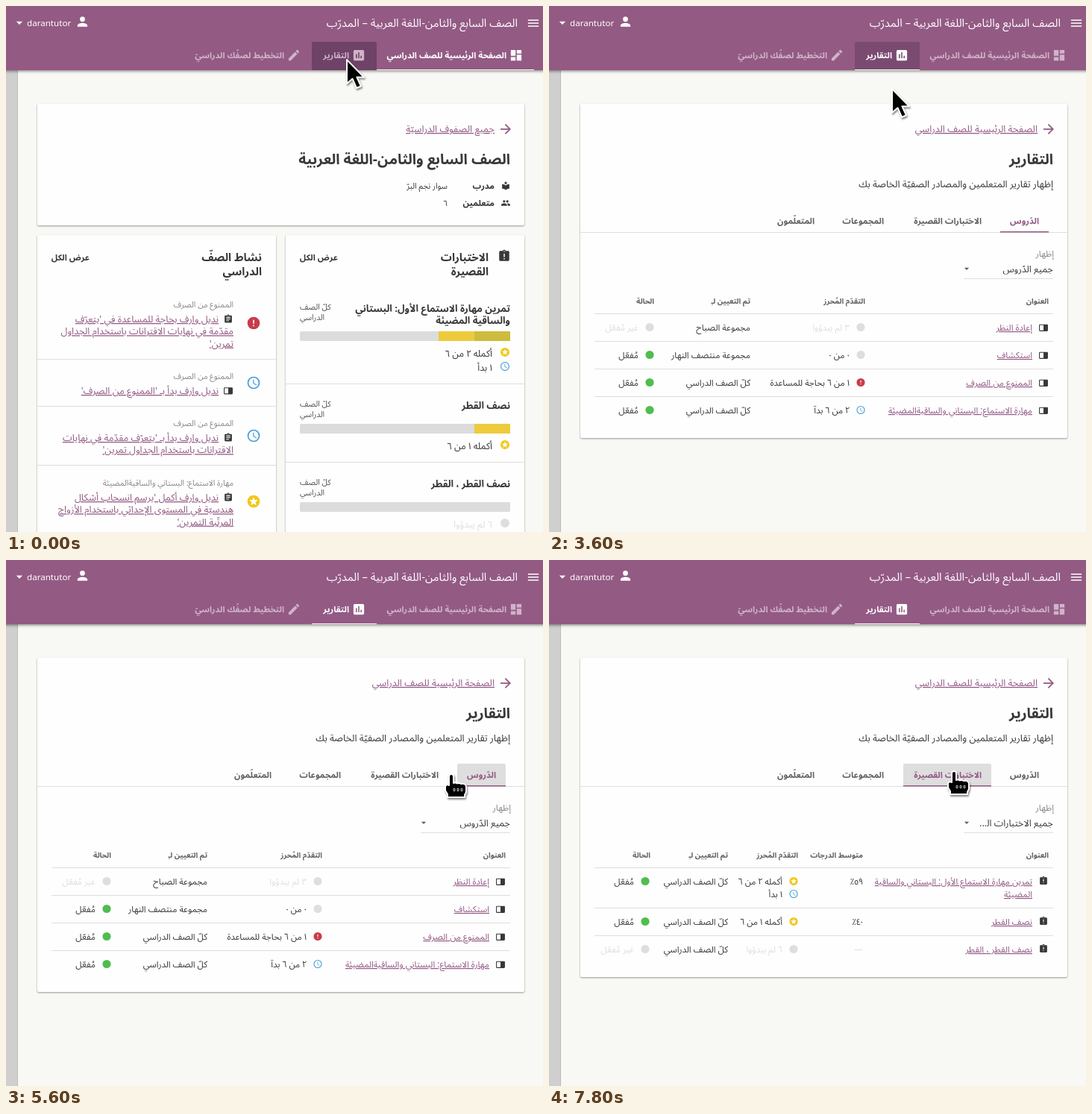
Animation, 720 px wide and 705 px high, one loop 8 s. Source, as an HTML page:

```html
<!DOCTYPE html>
<html lang="ar">
<head>
<meta charset="utf-8">
<title>التقارير</title>
<style>
html, body { margin: 0; width: 100%; height: 100%; overflow: hidden; background: #f8f8f4; }
svg { display: block; width: 100vw; height: 100vh; font-family: "Noto Sans", "Noto Sans Arabic", "DejaVu Sans", sans-serif; }
text { direction: rtl; }
.raised { filter: drop-shadow(0 1px 1px #0006); }
.bar { filter: drop-shadow(0 1px 2px #0008); }
.cursor { filter: drop-shadow(1px 2px 1px #0007); }
</style>
</head>
<body>
<svg id="stage" viewBox="0 0 720 705"></svg>
<script>
const stage = document.getElementById('stage');
const LOOP = 8000, STEP = 200;
const INK = '#383838', BRAND = '#935a84', GREY = '#868686', MUTED = '#616161',
  OFF = '#dedede', RED = '#c93b4b', BLUE = '#459fd6', YELLOW = '#f2c71b', GREEN = '#50bd4f';

const CLIPBOARD = 'M19 3h-4.18C14.4 1.84 13.3 1 12 1c-1.3 0-2.4.84-2.82 2H5c-1.1 0-2 .9-2 2v14c0 1.1.9 2 2 2h14c1.1 0 2-.9 2-2V5c0-1.1-.9-2-2-2z' +
  'M12 5c-.55 0-1-.45-1-1s.45-1 1-1 1 .45 1 1-.45 1-1 1z';
const DISC = 'M12 2a10 10 0 1 0 0 20 10 10 0 0 0 0-20z';
const ICONS = {
  menu: 'M3 18h18v-2H3zM3 13h18v-2H3zM3 6v2h18V6z',
  person: 'M12 12a4 4 0 1 0 0-8 4 4 0 0 0 0 8zM12 14c-2.67 0-8 1.34-8 4v2h16v-2c0-2.66-5.33-4-8-4z',
  drop: 'M7 10l5 5 5-5z',
  dashboard: 'M3 13h8V3H3zM3 21h8v-6H3zM13 21h8V11h-8zM13 3v6h8V3z',
  chart: 'M19 3H5a2 2 0 0 0-2 2v14a2 2 0 0 0 2 2h14a2 2 0 0 0 2-2V5a2 2 0 0 0-2-2zM9 17H7v-7h2zM13 17h-2V7h2zM17 17h-2v-4h2z',
  edit: 'M3 17.25V21h3.75L17.81 9.94l-3.75-3.75zM20.71 7.04c.39-.39.39-1.02 0-1.41l-2.34-2.34c-.39-.39-1.02-.39-1.41 0l-1.83 1.83 3.75 3.75z',
  arrow: 'M12 4l-1.41 1.41L16.17 11H4v2h12.17l-5.58 5.59L12 20l8-8z',
  reader: 'M12 11.55C9.64 9.35 6.48 8 3 8v11c3.48 0 6.64 1.35 9 3.55 2.36-2.19 5.52-3.55 9-3.55V8c-3.48 0-6.64 1.35-9 3.55zM12 8a3 3 0 1 0 0-6 3 3 0 0 0 0 6z',
  people: 'M16 11a3 3 0 1 0 0-6 3 3 0 0 0 0 6zM8 11a3 3 0 1 0 0-6 3 3 0 0 0 0 6zM8 13c-2.33 0-7 1.17-7 3.5V19h14v-2.5C15 14.17 10.33 13 8 13zM16 13l-.97.05C16.19 13.89 17 15.02 17 16.5V19h6v-2.5C23 14.17 18.33 13 16 13z',
  quiz: CLIPBOARD + 'M13 18h-2v-2h2zM13 14h-2V8h2z',
  exercise: CLIPBOARD + 'M14 17H7v-2h7zM17 13H7v-2h10zM17 9H7V7h10z',
  lesson: 'M21 4H3a2 2 0 0 0-2 2v13a2 2 0 0 0 2 2h18a2 2 0 0 0 2-2V6a2 2 0 0 0-2-2zM12 19H3V6h9z',
  help: DISC + 'M13 17h-2v-2h2zM13 13h-2V7h2z',
  clock: DISC + 'M12 20a8 8 0 1 1 0-16 8 8 0 0 1 0 16zM12.5 7H11v6l5.25 3.15.75-1.23-4.5-2.67z',
  star: DISC + 'M16.23 18L12 15.45 7.77 18l1.12-4.81-3.73-3.23 4.92-.42L12 5l1.92 4.53 4.92.42-3.73 3.23z',
  dot: DISC
};

// One size correction per weight keeps the layout if the Arabic fallback font differs.
const pen = document.createElement('canvas').getContext('2d');
function sizeFactor(weight, sample, em) {
  pen.font = `${weight} 100px ${getComputedStyle(stage).fontFamily}`;
  return em * 100 / pen.measureText(sample).width;
}
const FACTOR = {
  400: sizeFactor(400, 'إظهار تقارير المتعلمين والمصادر الصفيّة الخاصة بك', 261 / 13),
  700: sizeFactor(700, 'الصف السابع والثامن-اللغة العربية', 284 / 20)
};

const text = (x, y, size, content, fill = INK, weight = 400, extra = '') =>
  `<text x="${x}" y="${y}" font-size="${size * FACTOR[weight]}" font-weight="${weight}" fill="${fill}" ${extra}>${content}</text>`;
const bold = (x, y, size, content, fill = INK) => text(x, y, size, content, fill, 700);
const link = (x, y, size, content, fill = BRAND) => text(x, y, size, content, fill, 400, 'text-decoration="underline"');
const rect = (x, y, w, h, fill, extra = '') => `<rect x="${x}" y="${y}" width="${w}" height="${h}" fill="${fill}" ${extra}/>`;
const card = (x, y, w, h) => rect(x, y, w, h, '#fefefe', 'rx="2" class="raised"');
const rule = (x, y, w) => rect(x, y, w, 1, '#dedede');
const icon = (name, x, y, size, fill = INK) =>
  `<path d="${ICONS[name]}" fill="${fill}" fill-rule="evenodd" transform="translate(${x - size / 2} ${y - size / 2}) scale(${size / 24})"/>`;
const lines = (draw, x, y, size, gap, list) => list.map((s, i) => draw(x, y + i * gap, size, s)).join('');
const at = (t, keys) => keys.findLast(k => t >= k[0]).slice(1);

function header(t) {
  const onHome = t < 2800;
  const [tabFill] = at(t, [[0, '#6f4267'], [2800, '#7b4a71'], [3000, '#734469'], [3600, '#7b4a71'], [3800, 'none']]);
  const tab = (right, iconX, name, label, active) => {
    const fill = active ? '#fff' : '#cfb3c9';
    return icon(name, iconX, 66, 19, fill) + bold(right, 70, 11.75, label, fill);
  };
  return rect(0, 86, 16, 619, '#cfcfcf') + rect(15, 86, 1, 619, '#bcbcbc') +
    rect(-5, -5, 730, 91, BRAND, 'class="bar"') +
    rect(410, 48, 87, 38, tabFill, 'rx="2"') +
    icon('menu', 707, 23, 19, '#fff') +
    text(686, 28, 14.9, 'الصف السابع والثامن-اللغة العربية – المدرّب', '#fff') +
    icon('person', 102.5, 21, 20, '#fff') + icon('drop', 18, 22.5, 20, '#fff') +
    '<text x="28" y="27" font-size="11.6" fill="#fff" style="direction:ltr">darantutor</text>' +
    tab(671, 684, 'dashboard', 'الصفحة الرئيسية للصف الدراسي', onHome) +
    tab(460, 473, 'chart', 'التقارير', !onHome) +
    tab(373, 386, 'edit', 'التخطيط لصفّك الدراسيّ', false) +
    (onHome ? rect(497, 85, 211, 1, '#fff') : rect(410, 85, 87, 1, '#fff'));
}

function quizSummary(y, title, done, started, legend) {
  const barY = y + 18 + title.length * 6;
  const filled = 48 * (done + started);
  return lines(bold, 676, y + 4, 13.4, 16, title) +
    ['كلّ الصف', 'الدراسي'].map((s, i) => text(394, y + 1 + i * 14, 10.6, s, '#505050', 400, 'text-anchor="end"')).join('') +
    rect(394, barY, 282, 13, '#dcdcdc', 'rx="2"') +
    rect(676 - filled, barY, filled, 13, '#eecb3c') +
    rect(676 - 48 * started, barY, 48 * started, 13, '#cdbc3d') +
    legend.map(([name, color, label], i) =>
      icon(name, 669, barY + 28 + i * 19, 14.5, color) +
      text(652, barY + 34 + i * 19, 12.6, label, color === OFF ? OFF : INK)).join('');
}

function activity(y, topic, status, color, statusY, kind, rows) {
  return text(305, y, 10.7, topic, GREY) + icon(status, 332, statusY, 20, color) +
    icon(kind, 298, y + 15.5, 13) +
    rows.map((s, i) => link(i ? 305 : 285, y + 20 + i * 16.3, 12.8, s)).join('');
}

function home() {
  return card(42, 131, 653, 163) +
    icon('arrow', 670, 165, 21, BRAND) + link(655, 169, 12.9, 'جميع الصفوف الدراسيّة') +
    bold(676, 212, 20, 'الصف السابع والثامن-اللغة العربية') +
    icon('reader', 670, 241, 13) + bold(655, 245, 11.8, 'مدرب') + text(592, 245, 10.8, 'سوار نجم البرّ') +
    icon('people', 670, 264, 13) + bold(655, 268, 11.8, 'متعلمين') + text(592, 268, 10.8, '٦') +
    card(375, 307, 320, 420) + card(42, 307, 320, 420) +
    icon('quiz', 668, 335, 18) + lines(bold, 647, 342, 15.3, 19, ['الاختبارات', 'القصيرة']) +
    bold(445, 341, 11.6, 'عرض الكل') +
    quizSummary(406, ['تمرين مهارة الاستماع الأول: البستاني', 'والساقية المضيئة'], 1, 1,
      [['star', YELLOW, 'أكمله ٢ من ٦'], ['clock', BLUE, '١ بدأ']]) +
    rule(375, 506, 320) +
    quizSummary(536, ['نصف القطر'], 1, 0, [['star', YELLOW, 'أكمله ١ من ٦']]) +
    rule(375, 611, 320) +
    quizSummary(641, ['نصف القطر ، القطر'], 0, 0, [['dot', OFF, '٦ لم يبدؤوا']]) +
    lines(bold, 343, 342, 15.3, 19, ['نشاط الصفّ', 'الدراسي']) + bold(112, 341, 11.6, 'عرض الكل') +
    activity(404, 'الممنوع من الصرف', 'help', RED, 425, 'exercise',
      ["نديل وارف بحاجة للمساعدة في 'يتعرّف", 'مقدّمة في نهايات الاقترانات باستخدام الجداول', "تمرين'"]) +
    rule(42, 473, 320) +
    activity(500, 'الممنوع من الصرف', 'clock', BLUE, 505, 'lesson', ["نديل وارف بدأ بـ 'الممنوع من الصرف'"]) +
    rule(42, 536, 320) +
    activity(563, 'الممنوع من الصرف', 'clock', BLUE, 576, 'exercise',
      ["نديل وارف بدأ بـ 'يتعرّف مقدّمة في نهايات", "الاقترانات باستخدام الجداول تمرين'"]) +
    rule(42, 615, 320) +
    activity(643, 'مهارة الاستماع: البستاني والساقيةالمضيئة', 'star', YELLOW, 664, 'exercise',
      ["نديل وارف أكمل 'يرسم انسحاب أشكال", 'هندسيّة في المستوى الإحداثي باستخدام الأزواج', "المرتّبة التمرين'"]);
}

const PROGRESS = 'التقدّم المُحرز', ASSIGNED = 'تم التعيين لـِ', CLASS = 'كلّ الصف الدراسي';
const columns = list => list.map(([x, label]) => bold(x, 399, 10.3, label, MUTED)).join('');
const status = (x, y, name, color, label, fill = color === OFF ? OFF : INK) =>
  icon(name, x, y - 4.5, 13.4, color) + text(x - 15, y, 11.8, label, fill);
const enabled = (x, y, on) => status(x, y, 'dot', on ? GREEN : OFF, on ? 'مُفعّل' : 'غير مُفعّل');

function lessonTable() {
  const rows = [
    ['إعادة النظر', 'dot', OFF, '٣ لم يبدؤوا', 'مجموعة الصباح'],
    ['استكشاف', 'dot', OFF, '٠ من ٠', 'مجموعة منتصف النهار'],
    ['الممنوع من الصرف', 'help', RED, '١ من ٦ بحاجة للمساعدة', CLASS],
    ['مهارة الاستماع: البستاني والساقيةالمضيئة', 'clock', BLUE, '٢ من ٦ بدآ', CLASS]
  ];
  return columns([[670, 'العنوان'], [424, PROGRESS], [270, ASSIGNED], [141, 'الحالة']]) +
    rows.map(([title, name, color, label, group], i) => {
      const y = 435 + i * 37;
      return rule(61, y - 23, 615) + icon('lesson', 663, y - 4, 13) + link(648, y, 11.8, title) +
        status(418, y, name, color, label, i ? INK : OFF) +
        text(270, y, 11.8, group) + enabled(135, y, i > 0);
    }).join('');
}

function quizTable() {
  const rows = [
    [435, ['تمرين مهارة الاستماع الأول: البستاني والساقية', 'المضيئة'], '٥٩٪', 'star', YELLOW, 'أكمله ٢ من ٦'],
    [489, ['نصف القطر'], '٤٠٪', 'star', YELLOW, 'أكمله ١ من ٦'],
    [526, ['نصف القطر ، القطر'], '—', 'dot', OFF, '٦ لم يبدؤوا']
  ];
  return columns([[670, 'العنوان'], [421, 'متوسط الدرجات'], [334, PROGRESS], [240, ASSIGNED], [136, 'الحالة']]) +
    rows.map(([y, title, score, name, color, label], i) =>
      rule(61, y - 23, 615) + icon('quiz', 663, y - 5, 13) + lines(link, 648, y, 11.8, 17, title) +
      text(421, y, 11.8, score, i < 2 ? INK : OFF) + status(328, y, name, color, label) +
      text(240, y, 11.8, CLASS) + enabled(129, y, i < 2)).join('') +
    status(328, 452, 'clock', BLUE, '١ بدأ');
}

function reports(t) {
  const quizzes = t >= 7200;
  const [hover] = at(t, [[0, ''], [4200, 'lessons'], [5800, 'quizzes']]);
  const hoverBox = { lessons: [605, 65], quizzes: [475, 118] }[hover];
  const [quizColor] = at(t, [[0, MUTED], [7200, '#7a5e73'], [7400, BRAND]]);
  const [linkColor] = at(t, [[0, BRAND], [3800, '#6f4267'], [4000, BRAND]]);
  const tab = (right, label, fill = MUTED) => bold(right, 292, 11.75, label, fill);
  return card(42, 131, 653, quizzes ? 428 : 448) +
    icon('arrow', 670, 165, 21, BRAND) + link(655, 169, 12.9, 'الصفحة الرئيسية للصف الدراسي', linkColor) +
    bold(676, 212, 20, 'التقارير') +
    text(676, 243, 13, 'إظهار تقارير المتعلمين والمصادر الصفيّة الخاصة بك') +
    (hoverBox ? rect(hoverBox[0], 273, hoverBox[1], 30, '#dedede', 'rx="2"') : '') +
    rule(42, 303, 653) +
    (quizzes ? rect(475, 302, 118, 1.5, BRAND) : rect(605, 302, 65, 1.5, BRAND)) +
    tab(657, 'الدّروس', quizzes ? MUTED : BRAND) + tab(580, 'الاختبارات القصيرة', quizColor) +
    tab(449, 'المجموعات') + tab(356, 'المتعلّمون') +
    text(677, 336, 11.8, 'إظهار', GREY) +
    '<clipPath id="field"><rect x="556" y="340" width="122" height="19.5"/></clipPath>' +
    `<g clip-path="url(#field)">${text(676, 357, 12.6, quizzes ? 'جميع الاختبارات ال&zwj;...' : 'جميع الدّروس')}</g>` +
    icon('drop', 560, 352, 15, MUTED) + rule(556, 365, 120) +
    (quizzes ? quizTable() : lessonTable());
}

const POINTER = [
  [0, 'arrow', 457, 72], [200, 'hand', 453, 77], [400, 'hand', 449, 82],
  [3600, 'arrow', 460, 111], [3800, 'arrow', 621, 147], [4000, 'arrow', 603, 258],
  [4200, 'hand', 635, 289], [4400, 'hand', 626, 290], [5600, 'hand', 597, 289],
  [5800, 'hand', 577, 286], [6000, 'hand', 565, 283], [6200, 'hand', 557, 283], [7800, 'hand', 543, 285]
];
const SHAPES = {
  arrow: '<path d="M0 0V32L7.5 25.500 13 38 19 35.500 13.500 23.500H23z"/>',
  hand: '<path d="M-3 1a3 3 0 0 1 6 0v9q2.500-1.500 5 .5 2.500-1.500 5 .5 6.500-1 7 4v7l-2 4v3H-5v-4l-3-5V14q2-3 5-1z"/>' +
    '<path d="M3 17.500h2v3H3zM8 17.500h2v3H8zM13 17.500h2v3h-2z" stroke-width=".7"/>'
};
function cursor(t) {
  const [shape, x, y] = at(t, POINTER);
  return `<g class="cursor" transform="translate(${x} ${y})" fill="#000" stroke="#fff" stroke-width="2" stroke-linejoin="round">${SHAPES[shape]}</g>`;
}

let shown = -1;
function frame(now) {
  const t = Math.floor(now % LOOP / STEP) * STEP;
  if (t !== shown) {
    shown = t;
    stage.innerHTML = rect(0, 0, 720, 705, '#f8f8f4') + header(t) + (t < 2800 ? home() : reports(t)) + cursor(t);
  }
  requestAnimationFrame(frame);
}
frame(performance.now());
</script>
</body>
</html>
```
